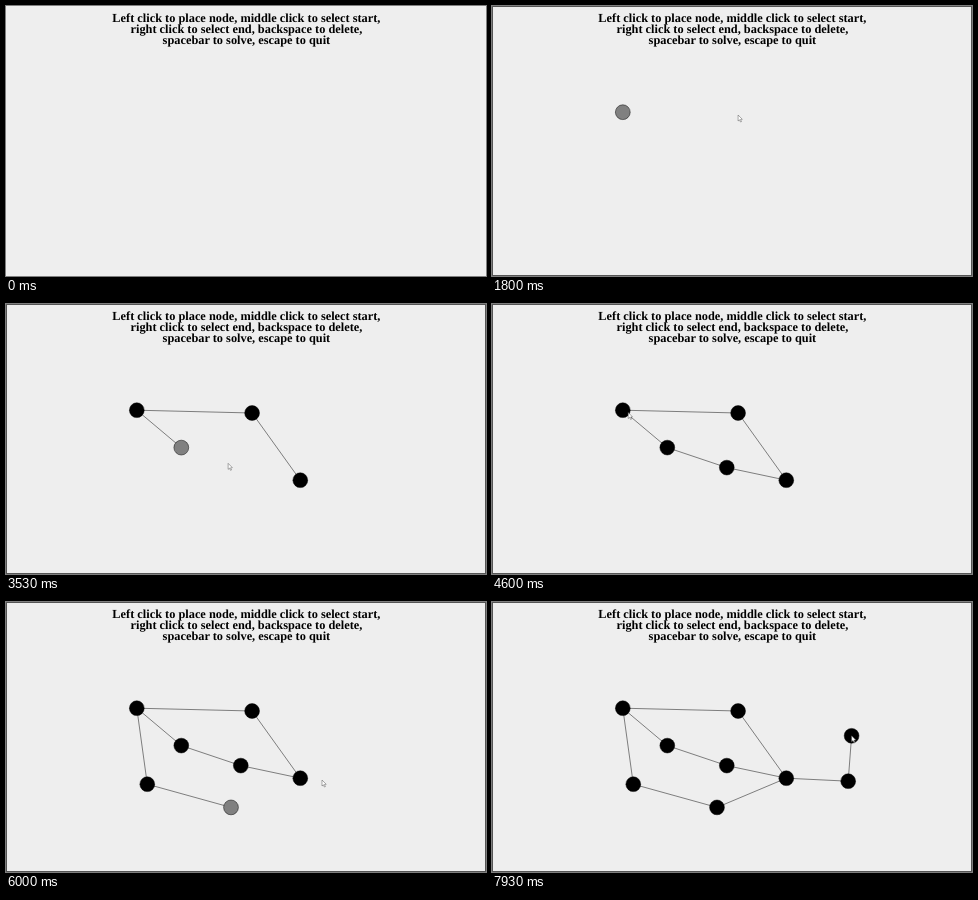
These frames come from a looping animation (480 px wide and 270 px high, 8000 ms). An HTML page with a canvas:

```html
<!DOCTYPE html>
<html lang="en">
<head>
<meta charset="utf-8">
<title>Node graph editor</title>
<style>
  html, body { margin: 0; width: 100%; height: 100%; overflow: hidden; background: #eee; }
  canvas { display: block; }
</style>
</head>
<body>
<canvas id="stage" width="480" height="270"></canvas>
<script>
const ctx = document.getElementById('stage').getContext('2d');
const LOOP = 8000, FPS = 15, WINDOW_OPENS = 8, RADIUS = 7.4;

const help = [
  'Left click to place node, middle click to select start,',
  'right click to select end, backspace to delete,',
  'spacebar to solve, escape to quit'
];
const nodes = [
  [130.8, 106.2], [246.1, 109], [294.3, 176.2], [175.3, 143.6], [234.8, 163.6],
  [141.3, 182.2], [225, 205.4], [356.2, 179.2], [359.6, 133.8]
];
const [a, b, c, d, e, f, g, h, i] = nodes;
const entry = [392, 228], hover = [316, 178];

// The cursor's itinerary as [tick, point]; arriving at a node clicks it.
const stops = [
  [6, entry], [19, a], [28, b], [33, c], [34, c], [43, a], [48, d], [57, e], [63, c],
  [71, a], [78, f], [86, g], [91, hover], [100, c], [104, c], [112, h], [117, i], [119, i]
];

// Clicking links the selected node to the clicked one; new nodes stay selected.
function graphAt(tick) {
  const placed = new Set(), edges = [];
  let selected = null;
  for (const [when, point] of stops) {
    if (when > tick) break;
    if (!nodes.includes(point)) continue;
    const existed = placed.has(point);
    placed.add(point);
    if (selected && selected !== point) {
      edges.push([selected, point]);
      selected = existed ? null : point;
    } else {
      selected = selected ? null : point;
    }
  }
  return { placed, edges, selected };
}

// Rest briefly after each stop, then ease out towards the next.
function cursorAt(tick) {
  let [left, [x, y]] = stops[0];
  for (const [when, [toX, toY]] of stops.slice(1)) {
    const start = left + 1.5, end = when - 1;
    if (tick <= start) break;
    const u = Math.min(1, (tick - start) / Math.max(1, end - start));
    const s = 1 - (1 - u) ** 2;
    x += (toX - x) * s;
    y += (toY - y) * s;
    left = when;
  }
  return [x, y];
}

function drawCursor(x, y) {
  const arrow = [[0, 0], [0, 6], [1.4, 4.8], [2.4, 7], [3.4, 6.6], [2.4, 4.5], [4.2, 4.3]];
  ctx.beginPath();
  for (const [dx, dy] of arrow) ctx.lineTo(x + dx, y + dy);
  ctx.closePath();
  ctx.fillStyle = '#fff';
  ctx.fill();
  ctx.strokeStyle = '#555';
  ctx.lineWidth = 0.5;
  ctx.stroke();
}

function draw(tick) {
  ctx.fillStyle = '#eee';
  ctx.fillRect(0, 0, 480, 270);

  ctx.fillStyle = '#000';
  ctx.font = 'bold 12.33px "Liberation Serif", "Times New Roman", serif';
  ctx.textAlign = 'center';
  ctx.textRendering = 'geometricPrecision';
  help.forEach((line, row) => ctx.fillText(line, 240.4, 16 + 11 * row));
  if (tick < WINDOW_OPENS) return;

  ctx.strokeStyle = '#555';
  ctx.lineWidth = 1;
  ctx.strokeRect(0.5, 0.5, 479, 269);

  const { placed, edges, selected } = graphAt(tick);
  ctx.strokeStyle = '#000';
  ctx.lineWidth = 0.48;
  for (const [from, to] of edges) {
    ctx.beginPath();
    ctx.moveTo(...from);
    ctx.lineTo(...to);
    ctx.stroke();
  }
  for (const node of placed) {
    ctx.beginPath();
    ctx.arc(...node, RADIUS, 0, 2 * Math.PI);
    ctx.fillStyle = node === selected ? '#808080' : '#000';
    ctx.fill();
    ctx.stroke();
  }
  drawCursor(...cursorAt(tick));
}

const began = performance.now();
function frame() {
  const time = (performance.now() - began) % LOOP;
  draw(Math.floor((time + 4) * FPS / 1000));
  requestAnimationFrame(frame);
}
frame();
</script>
</body>
</html>
```
